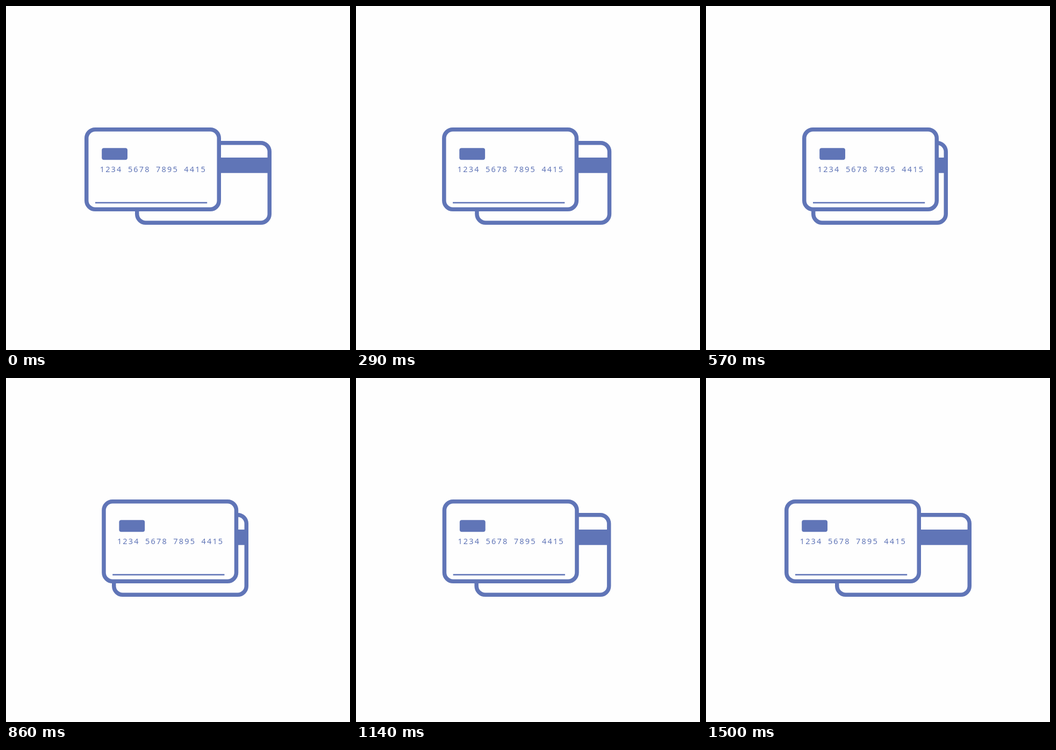
Write an HTML page with a canvas that moves like this. It is 640 by 640 pixels and loops after 1.71 s.

```html
<!DOCTYPE html>
<html lang="en">
<head>
<meta charset="utf-8">
<title>Two cards</title>
<style>
  html, body { margin: 0; width: 100%; height: 100%; overflow: hidden; background: #fefefe; }
  canvas { display: block; width: 640px; height: 640px; }
</style>
</head>
<body>
<canvas id="stage" width="640" height="640"></canvas>
<script>
const ctx = document.getElementById('stage').getContext('2d');
const BLUE = '#6075b7';
const PAPER = '#fefefe';
const LOOP = 1710;
const FPS = 14;
const CLOSE_END = 700;
const OPEN_END = 1464;
const FRONT_SHIFT = 37.4;
const BACK_SHIFT = -FRONT_SHIFT * 4 / 3;
const CARD = { w: 254, h: 156, r: 20, border: 7.5 };

const clamp = v => Math.min(1, Math.max(0, v));

// Soft ease: part linear, part smoothstep.
function ease(x) {
  x = clamp(x);
  return 0.3 * x + 0.7 * x * x * (3 - 2 * x);
}

// How far the cards have slid together, 0 to 1.
function overlap(ms) {
  return ms < CLOSE_END
    ? ease(ms / CLOSE_END)
    : ease((OPEN_END - ms) / (OPEN_END - CLOSE_END));
}

function roundRect(x, y, w, h, r) {
  ctx.beginPath();
  ctx.roundRect(x, y, w, h, r);
}

function cardBase(x, y) {
  const { w, h, r, border } = CARD;
  const half = border / 2;
  roundRect(x + half, y + half, w - border, h - border, r - half);
  ctx.fillStyle = PAPER;
  ctx.fill();
  ctx.strokeStyle = BLUE;
  ctx.lineWidth = border;
  ctx.stroke();
  ctx.fillStyle = BLUE;
}

function backCard(x) {
  cardBase(x, 251);
  ctx.fillRect(x + 2, 282, CARD.w - 4, 28.7);
}

function frontCard(x) {
  cardBase(x, 226);
  roundRect(x + 32.2, 264.2, 47.8, 22.1, 4);
  ctx.fill();
  ctx.fillRect(x + 20, 364.7, 208.2, 2.6);
  ctx.font = '500 14.5px "Noto Sans", "Open Sans", sans-serif';
  ctx.letterSpacing = '2.15px';
  ctx.wordSpacing = '4.5px';
  ctx.fillText('1234 5678 7895 4415', x + 28.7, 308.5);
}

function draw(now) {
  const ticks = Math.floor((now % LOOP) / 10);
  const step = Math.floor((ticks + 0.5) * FPS / 100);
  const amount = overlap(step * 1000 / FPS);
  ctx.fillStyle = PAPER;
  ctx.fillRect(0, 0, 640, 640);
  backCard(240 + BACK_SHIFT * amount);
  frontCard(146 + FRONT_SHIFT * amount);
}

let start;
function tick(now) {
  start ??= now;
  draw(now - start);
  requestAnimationFrame(tick);
}
draw(0);
requestAnimationFrame(tick);
</script>
</body>
</html>
```
